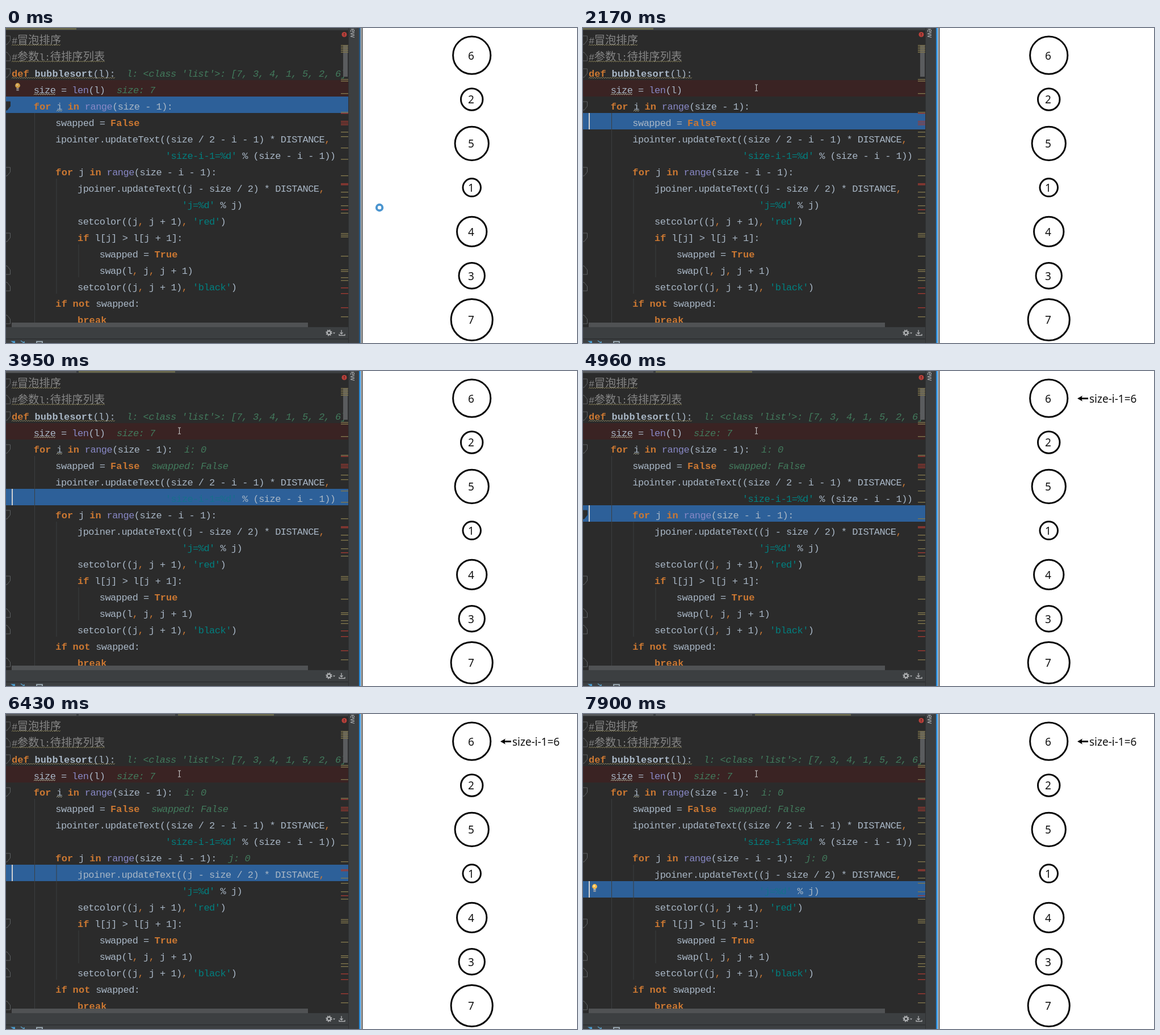
Write an HTML page that moves like this. It is 1006 px wide and 556 px high and loops after 8000 ms.

```html
<!DOCTYPE html>
<html lang="en">
<head>
<meta charset="utf-8">
<title>Bubble sort, step by step</title>
<style>
html, body { margin: 0; width: 100%; height: 100%; overflow: hidden; background: #fff; }
svg { display: block; width: 1006px; height: 556px; }
text { white-space: pre; }
.code { font: 17px "Liberation Mono", "Noto Sans Mono", monospace; }
.bold { font-weight: bold; }
.hint { font-style: italic; }
.cjk { font: 300 19.33px "Noto Sans CJK SC", "Noto Sans CJK", sans-serif; }
.label { font: 19px "Noto Sans", "Open Sans", sans-serif; }
</style>
</head>
<body>
<svg id="stage" viewBox="0 0 1006 556"></svg>
<script>
const LOOP = 8000, LEFT = 10, CHAR = 9.67, BOLD = 10.29, PITCH = 29, FONT_ADVANCE = 17 * 0.6001;
const stage = document.getElementById('stage');

function add(tag, attrs, parent = stage, content) {
  const el = document.createElementNS('http://www.w3.org/2000/svg', tag);
  for (const k in attrs) el.setAttribute(k, attrs[k]);
  if (content !== undefined) el.textContent = content;
  parent.appendChild(el);
  return el;
}
const rect = (x, y, width, height, fill, parent) => add('rect', { x, y, width, height, fill }, parent);
const path = (d, attrs, parent) => add('path', { d, fill: 'none', ...attrs }, parent);
const show = (el, on) => el.setAttribute('visibility', on ? 'visible' : 'hidden');
const rowTop = row => 5 + PITCH * row;
const column = n => LEFT + n * CHAR;

// Editor surface
rect(0, 0, 603, 556, '#2b2b2b');
rect(0, 0, 603, 4, '#3c3f41');
const tabs = [[0, 124], [128, 298], [303, 472]].map(([a, b]) => rect(a, 0, b - a, 3, '#56585a'));
rect(0, rowTop(3), 603, PITCH, '#3a2323');
const highlight = rect(0, 0, 603, PITCH, '#2d6099');
for (const [x, top, bottom] of [[50, 150, 527], [88.5, 266, 469], [127.5, 382, 440]])
  rect(x, top, 1, bottom - top, '#3b3e40');

// Fold marks
function fold(row, opens) {
  const y = rowTop(row) + 9;
  return path(opens ? `M0 ${y}H7.5V${y + 8}L2 ${y + 15}H0` : `M0 ${y}H2L7.5 ${y + 7}V${y + 15}H0`,
    { stroke: '#5c5f61', 'stroke-width': 1, fill: '#2b2b2b' });
}
const folds = {};
[0, 2, 4, 8, 12].forEach(r => folds[r] = fold(r, true));
[1, 14, 15, 17].forEach(r => fold(r, false));

// Code
const COLORS = { keyword: '#cc7832', builtin: '#8888c6', string: '#008080', comma: '#cc7832', plain: '#a9b7c6' };
const lines = [
  [2, 0, 'def bubblesort(l):'],
  [3, 4, 'size = len(l)'],
  [4, 4, 'for i in range(size - 1):'],
  [5, 8, 'swapped = False'],
  [6, 8, 'ipointer.updateText((size / 2 - i - 1) * DISTANCE,'],
  [7, 28, "'size-i-1=%d' % (size - i - 1))"],
  [8, 8, 'for j in range(size - i - 1):'],
  [9, 12, 'jpoiner.updateText((j - size / 2) * DISTANCE,'],
  [10, 31, "'j=%d' % j)"],
  [11, 12, "setcolor((j, j + 1), 'red')"],
  [12, 12, 'if l[j] > l[j + 1]:'],
  [13, 16, 'swapped = True'],
  [14, 16, 'swap(l, j, j + 1)'],
  [15, 12, "setcolor((j, j + 1), 'black')"],
  [16, 8, 'if not swapped:'],
  [17, 12, 'break']
];
const strings = {}, lineEnd = {};

function code(x, row, value, fill, style = '') {
  const step = style === 'bold' ? BOLD : CHAR;
  return add('text', {
    x, y: rowTop(row) + 22.5, fill, class: 'code ' + style, 'letter-spacing': step - FONT_ADVANCE
  }, stage, value);
}
function kind(token) {
  if (/^(def|for|in|if|not|break|True|False)$/.test(token)) return 'keyword';
  if (/^(len|range)$/.test(token)) return 'builtin';
  if (token[0] === "'") return 'string';
  return token === ',' ? 'comma' : 'plain';
}
for (const [row, indent, source] of lines) {
  let x = column(indent);
  for (const token of source.match(/'[^']*'|\w+|,|[^\w',]+/g)) {
    const type = kind(token);
    const bold = type === 'keyword' || token === 'bubblesort';
    const el = code(x, row, token, COLORS[type], bold ? 'bold' : '');
    if (type === 'string') strings[row] = el;
    x += token.length * (bold ? BOLD : CHAR);
  }
  lineEnd[row] = x;
}
function comment(row, parts) {
  let x = LEFT;
  for (const part of parts) {
    const wide = part.charCodeAt(0) > 255;
    if (wide) add('text', { x, y: rowTop(row) + 23, fill: '#858585', class: 'cjk' }, stage, part);
    else code(x, row, part, '#858585');
    x += part.length * (wide ? 2 : 1) * CHAR;
  }
  return x;
}
const titleEnd = comment(0, ['#', '冒泡排序']);
const paramEnd = comment(1, ['#', '参数', 'l:', '待排序列表']);

function squiggle(row, from, to, stroke) {
  const y = rowTop(row) + 26;
  let d = `M${from} ${y}`;
  for (let x = from + 2, up = true; x <= to; x += 2, up = !up) d += `L${x} ${up ? y - 2 : y}`;
  path(d, { stroke, 'stroke-width': 1 });
}
squiggle(0, 10, titleEnd, '#827b55');
squiggle(1, 10, paramEnd, '#827b55');
squiggle(2, 10, lineEnd[2], '#857e5c');
squiggle(3, 49, 87, '#aeb09a');
squiggle(4, 89, 99, '#aeb09a');

// Inline values: row, text, time of first appearance
const hints = [
  [2, "l: <class 'list'>: [7, 3, 4, 1, 5, 2, 6]", 0],
  [3, 'size: 7', 0],
  [4, 'i: 0', 2320],
  [5, 'swapped: False', 3260],
  [8, 'j: 0', 6350]
].map(([row, value, from]) => ({ from, el: code(lineEnd[row] + 20.5, row, value, '#427a5c', 'hint') }));
// The first value moves right once the call has more state to show
const listHint = hints[0].el, listX = lineEnd[2] + 20.5;
listHint.setAttribute('x', listX);

// Scrollbars and error stripe
rect(10, 520, 522, 8, '#505254');
rect(594, 30, 8, 56, '#5a5c5e');
const mark = fill => y => rect(590, y, 13, 1.4, fill);
[30, 33, 36, 39, 42, 90, 93, 115, 148, 183, 191, 211, 231, 260, 289, 298, 313, 326,
  362, 365, 368, 402, 426, 429, 440, 445, 509].forEach(mark('#81764d'));
[150, 164, 167, 170, 274, 276, 320, 458, 468, 493].forEach(mark('#a03a32'));
add('circle', { cx: 596, cy: 11.5, r: 4.5, fill: '#b8403a' });
rect(595.4, 9, 1.2, 3, '#3a2020');
rect(595.4, 13, 1.2, 1.2, '#3a2020');

// Bottom panel
rect(0, 528, 623, 28, '#3c3f41');
rect(0, 548, 603, 1.5, '#2c2e30');
add('circle', { cx: 569, cy: 538, r: 3.2, fill: 'none', stroke: '#afb1b3', 'stroke-width': 2.2 });
add('circle', { cx: 569, cy: 538, r: 4.9, fill: 'none', stroke: '#afb1b3', 'stroke-width': 1.6, 'stroke-dasharray': '1.9 1.95' });
path('M576 537.5H580L578 540Z', { fill: '#afb1b3' });
path('M591 533V540M588.5 537.5L591 540L593.5 537.5M587 540V542.5H597V540', { stroke: '#afb1b3', 'stroke-width': 1.3 });
path('M8 552.5H16V556H13Z', { fill: '#4a9ccf' });
path('M26 552L32 556M32 553V556', { stroke: '#5ba0c8', 'stroke-width': 1.5 });
path('M54 556V553.5H64V556', { stroke: '#9fb0ba', 'stroke-width': 1.8 });

// Side panel and window edge
rect(603, 0, 20, 556, '#3c3f41');
rect(603, 0, 1, 556, '#2f3133');
add('text', { transform: 'translate(607 -9) rotate(90)', fill: '#b4b6b8', 'font-size': 12,
  'font-family': '"Noto Sans", sans-serif' }, stage, 'View');
const edge = rect(622, 0, 3, 556, '#2f5d86');
rect(625, 0, 2, 556, '#e8e8e8');
rect(626.5, 0, 1.7, 556, '#303030');

// Bubbles
[6, 2, 5, 1, 4, 3, 7].forEach((n, i) => {
  const cy = 48.2 + 77.8 * i;
  add('circle', { cx: 820.7, cy, r: 12.3 + 3.47 * n, fill: '#fff', stroke: '#0a0a0a', 'stroke-width': 3 });
  add('text', { x: 819.5, y: cy + 7.3, 'text-anchor': 'middle', class: 'label', fill: '#111' }, stage, n);
});
const pointer = add('g', {});
path('M877 48.5H890', { stroke: '#000', 'stroke-width': 3 }, pointer);
path('M871 48.5L880 43.5L878 48.5L880 53.5Z', { fill: '#000' }, pointer);
add('text', { x: 892, y: 55.5, class: 'label', fill: '#111' }, pointer, 'size-i-1=6');

// Caret, bulb, mouse
const caret = rect(0, 0, 2, PITCH, '#d0d0d0');
const bulb = add('g', {});
add('circle', { cx: 20.5, cy: 9.5, r: 4.4, fill: '#f2b84b' }, bulb);
add('circle', { cx: 19.7, cy: 8.5, r: 1.8, fill: '#ffe3a0' }, bulb);
rect(18.3, 14, 4.4, 1.4, '#c8c8c8', bulb);
rect(18.3, 16.4, 4.4, 2.2, '#a8a8a8', bulb);
const ring = add('circle', { r: 5.2, fill: 'none', stroke: '#4b95cf', 'stroke-width': 4 });
const beam = path('M-2.5 -5.5H-0.7L0 -5L0.7 -5.5H2.5M0 -5V5M-2.5 5.5H-0.7L0 5L0.7 5.5H2.5',
  { stroke: '#c8c8c8', 'stroke-width': 1.1 });

// Latest entry of a [time, ...values] table
const at = (table, t) => table.filter(e => e[0] <= t).pop();

const ROWS = [[0, 4], [2170, 5], [3090, 6], [3870, 7], [4960, 8], [6200, 9], [7040, 10]];
// time, caret row (-1 hides it), x
const CARET = [[0, -1], [1770, 3, 175], [2170, 5, 10], [2780, -1], [3090, 6, 10], [3870, 7, 10], [4790, -1],
  [4960, 8, 10], [5740, -1], [6200, 9, 10], [7040, 10, 10]];
// time, bulb row, opacity
const BULB = [[0, 3, 0.8], [1000, 3, 0.5], [1160, 3, 0.25], [1310, -1, 0], [4790, 7, 1], [4960, -1, 0], [7900, 10, 1]];
// time, active tab
const TAB = [[0, 0], [2320, 1], [6350, 2]];
const MOVES = [[70, 460, 658, 317, 343, 116], [780, 1160, 343, 116, 305.5, 105.5]];

function mouse(t) {
  const [from, to, x0, y0, x1, y1] = t < 780 ? MOVES[0] : MOVES[1];
  const step = (to - from) / 5;
  const p = Math.max(0, Math.min(6, Math.floor((t - from) / step + 1e-6) + 1)) / 6;
  const e = p * p * (3 - 2 * p);
  return [x0 + (x1 - x0) * e, y0 + (y1 - y0) * e];
}

function render(t) {
  const row = at(ROWS, t)[1];
  highlight.setAttribute('y', rowTop(row));
  for (const r in strings) strings[r].setAttribute('fill', +r === row ? '#17708c' : COLORS.string);
  for (const r in folds) folds[r].setAttribute('stroke', +r === row ? '#2b2b2b' : '#5c5f61');

  const cleared = (t >= 2170 && t < 2320) || (t >= 6200 && t < 6350);
  hints.forEach(h => show(h.el, !cleared && t >= h.from));
  listHint.setAttribute('x', listX + (t >= 0 ? 0 : 0));

  const active = at(TAB, t)[1];
  tabs.forEach((tab, i) => {
    show(tab, i <= active);
    tab.setAttribute('fill', i === active ? '#67664a' : '#56585a');
  });

  const [, caretRow, caretX] = at(CARET, t);
  show(caret, caretRow >= 0);
  if (caretRow >= 0) {
    caret.setAttribute('x', caretX);
    caret.setAttribute('y', rowTop(caretRow));
  }
  const [, bulbRow, opacity] = at(BULB, t);
  bulb.setAttribute('opacity', opacity);
  bulb.setAttribute('transform', `translate(0 ${rowTop(bulbRow)})`);

  edge.setAttribute('fill', t < 150 ? '#2f5d86' : '#2f8fdc');
  show(pointer, t >= 4960);

  const [x, y] = mouse(t);
  const busy = x > 604;
  show(ring, busy);
  show(beam, !busy);
  (busy ? ring : beam).setAttribute('transform', `translate(${x} ${y})`);
}

const start = performance.now();
function frame() {
  render((performance.now() - start) % LOOP);
  requestAnimationFrame(frame);
}
render(0);
requestAnimationFrame(frame);
</script>
</body>
</html>
```
